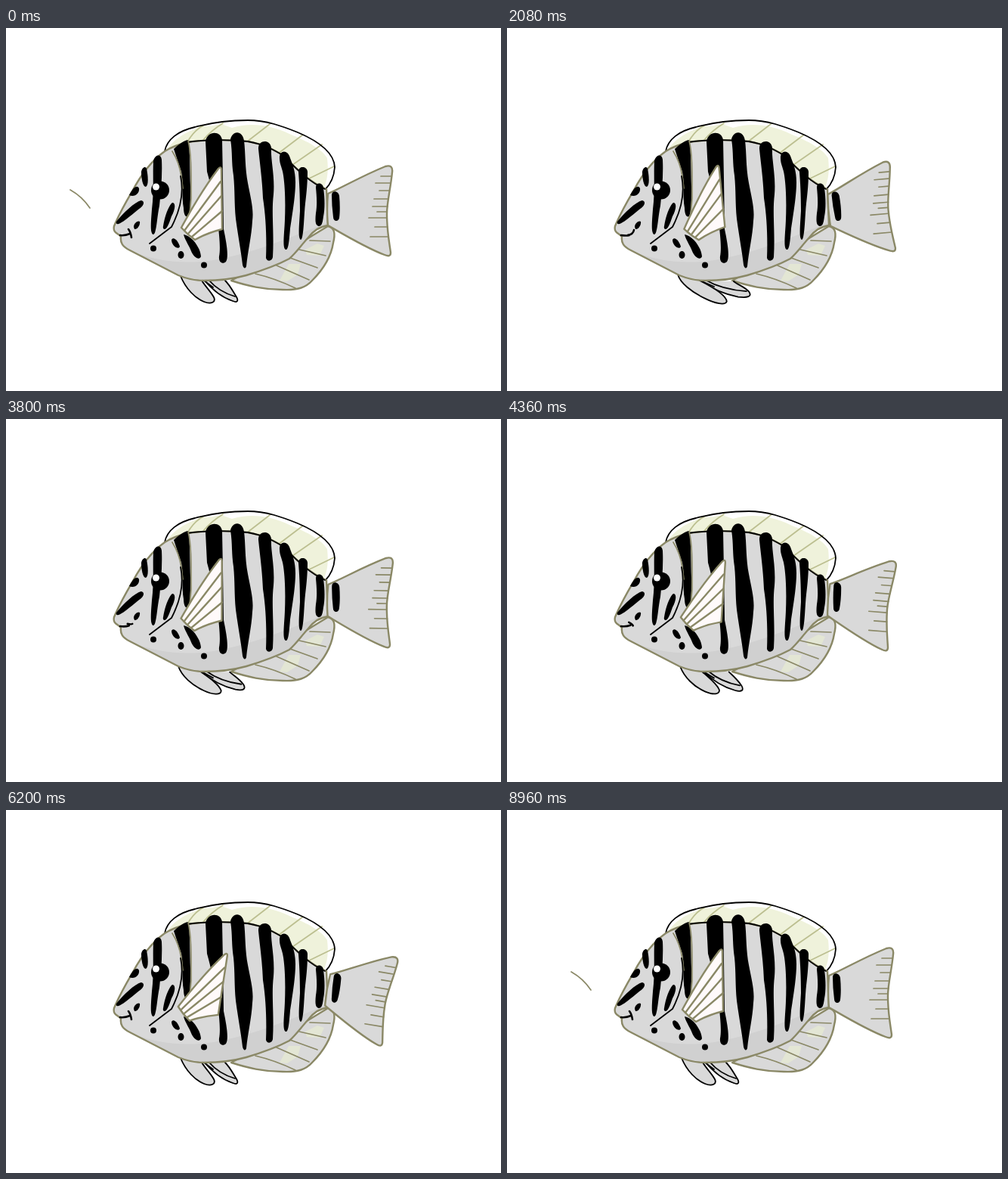
An HTML page without scripts for the animation above (9000 ms loop, 655 px wide and 480 px high).

```html
<!DOCTYPE html>
<html lang="en">
<head>
<meta charset="utf-8">
<title>Striped fish</title>
<style>
  html, body { margin: 0; width: 100%; height: 100%; overflow: hidden; background: #fff; }
  svg { display: block; width: 655px; height: 480px; }
  .skin { fill: #d9d9d9; }
  .edge { stroke: #8a8866; stroke-width: 2.4; }
  .ink { stroke: #000; stroke-width: 1.8; }
  .mouth { fill: none; stroke: #000; stroke-width: 2.6; }
  .line { fill: none; }
  .ray { fill: none; stroke: #bcbf90; stroke-width: 1.8; }
  .thin { fill: none; stroke: #8a8866; stroke-width: 1.7; }
  path { stroke-linecap: round; stroke-linejoin: round; }
</style>
</head>
<body>
<svg viewBox="0 0 655 480">
  <defs>
    <path id="trunk" d="M143 262C150 245 160 228 167 216C178 195 192 176 210 163C221 156 232 153 240 151C268 147 300 148 320 150C342 154 352 160 366 168C386 188 402 204 424 213L426 261C414 263 407 268 400 277C390 288 384 297 375 305C358 314 338 321 318 327C300 332 283 334 262 334C248 334 238 331 228 327L164 294C154 289 151 284 152 276C148 271 141 271 143 262Z"/>
    <clipPath id="inside"><use href="#trunk"/></clipPath>
  </defs>

  <path class="thin" d="M85 214Q101 223 111 238">
    <animate attributeName="visibility" dur="9s" repeatCount="indefinite" calcMode="discrete"
      keyTimes="0;.167;.76" values="visible;hidden;visible"/>
  </path>

  <!-- dorsal fin -->
  <path fill="#fff" d="M210 163C213 147 228 136 250 131C272 125 296 122 320 122C345 122 366 130 386 138C412 149 434 164 435 184C434 198 429 207 422 214L320 190Z"/>
  <path fill="#eff2db" d="M213 161C221 148 236 139 247 135L259 129L268 130L285 127L299 132C325 124 352 129 375 140C400 150 419 161 425 172C427 190 425 203 420 212L320 190Z"/>
  <path class="ray" d="M240 151Q248 136 261 129M261 148Q272 135 287 126M318 151L349 127M360 166L393 141M379 181L418 154M399 200L434 183"/>
  <path class="line ink" d="M210 163C213 147 228 136 250 131C272 125 296 122 320 122C345 122 366 130 386 138C412 149 434 164 435 184C434 198 429 207 422 214"/>

  <!-- anal fin -->
  <path class="skin edge" d="M298 334C320 341 340 346 366 346C386 347 397 343 405 334C418 321 430 304 433 284C436 272 435 264 426 262L380 290Z"/>
  <path fill="#e3e6d4" d="M396 293L412 285L421 288L415 301L398 300ZM374 312L390 312L386 326L372 335L362 334Z"/>
  <path class="thin" d="M402 281L429 282M388 293L423 301M376 304L412 317M358 314L401 333M330 325Q356 331 383 344"/>

  <!-- pelvic fins -->
  <path class="skin ink" d="M262 333C272 345 285 356 300 361C307 364 308 360 304 354C299 346 296 340 290 334">
    <animate attributeName="d" dur="9s" repeatCount="indefinite" calcMode="spline" keyTimes="0;.25;.65;1"
      keySplines=".37 0 .63 1;.37 0 .63 1;0 0 1 1"
      values="M262 333C272 345 285 356 300 361C307 364 308 360 304 354C299 346 296 340 290 334;M255 334C267 342 285 351.5 306 355.5C319 357 324 355 321 349.5C316 342.5 306 340 300 335;M262 333C272 345 285 356 300 361C307 364 308 360 304 354C299 346 296 340 290 334;M262 333C272 345 285 356 300 361C307 364 308 360 304 354C299 346 296 340 290 334"/>
  </path>
  <path class="line ink" d="M268 333Q282 349 303 355M262 334L274 343">
    <animate attributeName="d" dur="9s" repeatCount="indefinite" calcMode="spline" keyTimes="0;.25;.65;1"
      keySplines=".37 0 .63 1;.37 0 .63 1;0 0 1 1"
      values="M268 333Q282 349 303 355M262 334L274 343;M262 333Q285 346 317 348M258 335L274 342;M268 333Q282 349 303 355M262 334L274 343;M268 333Q282 349 303 355M262 334L274 343"/>
  </path>
  <path class="skin ink" d="M231 328C238 345 250 357 262 362C272 366 278 362 275 356C270 347 262 340 258 332">
    <animate attributeName="d" dur="9s" repeatCount="indefinite" calcMode="spline" keyTimes="0;.25;.65;1"
      keySplines=".37 0 .63 1;.37 0 .63 1;0 0 1 1"
      values="M231 328C238 345 250 357 262 362C272 366 278 362 275 356C270 347 262 340 258 332;M226 326C229 337 244 349 262 357.5C275 364 289 367.5 291 361.5C290 353 271 342 255 334;M231 328C238 345 250 357 262 362C272 366 278 362 275 356C270 347 262 340 258 332;M231 328C238 345 250 357 262 362C272 366 278 362 275 356C270 347 262 340 258 332"/>
  </path>

  <!-- body -->
  <use href="#trunk" class="skin"/>
  <path clip-path="url(#inside)" fill="#d0d0d0" d="M160 292C200 312 250 313 290 304C335 294 380 276 430 255L430 340L160 340Z"/>
  <use href="#trunk" class="line edge"/>
  <path class="line ink" d="M240 151C268 147 300 148 320 150C342 154 352 160 366 168C386 188 402 204 422 213"/>

  <!-- stripes -->
  <path d="M222 160C229 153 237 148 241 148C244 165 243 190 244 210C244 228 244 243 241 249C237 251 235 245 235 238C232 222 235 205 232 190Q227 175 222 160Z"/>
  <path class="thin" d="M241 149C245 165 245 185 245 225L243 246M220 163Q229 177 232 196L234 212"/>
  <path d="M264 150C266 136 284 135 286 148L287 200L288 266C292 285 295 303 291 309C287 313 281 310 282 302C286 283 276 225 266 190Z"/>
  <path d="M297 147C300 135 313 135 315 149C317 165 316 185 320 205C324 226 328 240 326 255C325 275 320 295 318 315C317 319 314 318 313 313C311 295 307 275 304 252C302 232 303 215 301 195C298 175 300 167 297 147Z"/>
  <path d="M334 160C333 148 349 146 351 158C350 175 356 195 354 220C351 245 355 270 353 303C352 309 345 309 344 304C345 280 344 250 340 225C339 200 336 180 334 160Z"/>
  <path d="M362 173C361 161 373 160 376 172C379 180 383 188 383 204C383 222 379 245 376 265C375 278 374 292 371 293C367 293 367 285 368 270C370 245 370 215 367 195C366 186 362 180 362 173Z"/>
  <path d="M387 191C386 182 398 182 399 190C399 203 398 215 396 232C394 250 394 280 390 280C386 278 388 260 389 242C389 220 388 203 387 191Z"/>
  <path d="M410 211C410 203 420 204 420 212C422 225 422 240 420 249C419 257 418 262 414 262C409 261 409 255 410 245C412 233 411 222 410 211Z"/>

  <!-- face -->
  <path d="M179 190C180 184 185 182 186 186C188 195 189 208 185 210C181 210 179 199 179 190Z"/>
  <path d="M195 176C197 167 205 166 206 174C207 195 205 215 203 235C200 248 199 273 195 273C190 272 192 255 193 240C196 215 194 195 195 176Z"/>
  <circle cx="204" cy="214.500" r="12"/>
  <circle cx="198.500" cy="210" r="4.500" fill="#fff"/>
  <path d="M163 221C168 210 174 207 176 212C177 219 170 224 163 221Z"/>
  <path d="M146 256C155 245 170 230 179 228C184 229 183 235 175 240C165 248 155 257 149 259Q145 260 146 256Z"/>
  <path d="M208 262C210 248 216 234 220 231C225 231 224 240 219 249C216 258 213 266 210 266Q207 266 208 262Z"/>
  <path d="M169 263C169 258 175 254 177 256C178 261 173 267 170 266Z"/>
  <path d="M219 280C222 275 228 282 230 289C228 294 219 288 219 280Z"/>
  <ellipse cx="231.500" cy="300" rx="4" ry="5"/>
  <circle cx="195" cy="291.500" r="4"/>
  <circle cx="262" cy="313.500" r="4"/>
  <path d="M235 273C246 275 257 290 258 302C256 308 248 303 245 295C242 287 237 281 235 273Z"/>
  <path class="line ink" d="M231 196C235 215 232 238 219 263L190 285"/>
  <path class="mouth" d="M151 274Q157 275 164 272M162 266Q165 270 166 277">
    <animate attributeName="d" dur="9s" repeatCount="indefinite" calcMode="spline" keyTimes="0;.25;.65;1"
      keySplines=".37 0 .63 1;.37 0 .63 1;0 0 1 1"
      values="M151 274Q157 275 164 272M162 266Q165 270 166 277;M151 274Q158 275 162 274M160 274Q167 273 168 267;M151 274Q157 275 164 272M162 266Q165 270 166 277;M151 274Q157 275 164 272M162 266Q165 270 166 277"/>
  </path>

  <!-- tail -->
  <g>
    <animateTransform attributeName="transform" type="rotate" dur="9s" repeatCount="indefinite" calcMode="spline"
      keyTimes="0;.25;.65;.8;1" keySplines=".37 0 .63 1;.37 0 .63 1;.12 0 .39 0;.61 1 .88 1"
      values="0 438 237;-5 438 237;10 438 237;4.300 438 237;0 438 237"/>
    <path class="skin edge" d="M426 219C445 211 470 196 502 183C509 181 512 184 511 191C509 212 504 230 504 246C504 268 507 282 509 297C509 302 506 302 501 300C477 291 452 276 426 261Q424 240 426 219Z"/>
    <path d="M431 221C431 214 440 215 441 222C442 233 442 243 441 251C440 257 433 256 433 250Q431 235 431 221Z"/>
    <path class="thin" d="M496 196L510 196M489 205L508 205M494 215L507 215M487 226L506 226M485 236L505 236M491 243L504 243M480 251L504 251M488 263L505 263M482 276L506 276"/>
  </g>

  <!-- pectoral fin -->
  <g>
    <animateTransform attributeName="transform" type="rotate" dur="9s" repeatCount="indefinite" calcMode="spline"
      keyTimes="0;.25;.65;.8;1" keySplines=".37 0 .63 1;.37 0 .63 1;.12 0 .39 0;.61 1 .88 1"
      values="0 254 237;-5 254 237;10 254 237;4.300 254 237;0 254 237"/>
    <path class="edge" fill="#fffafa" d="M232 264C245 240 262 211 281 186Q285 182 285 188L286 266Q266 271 250 280Q240 273 232 264Z"/>
    <path class="line edge" d="M236 268L284 203M241 272L285 222M246 276L286 242"/>
  </g>
</svg>
</body>
</html>
```
